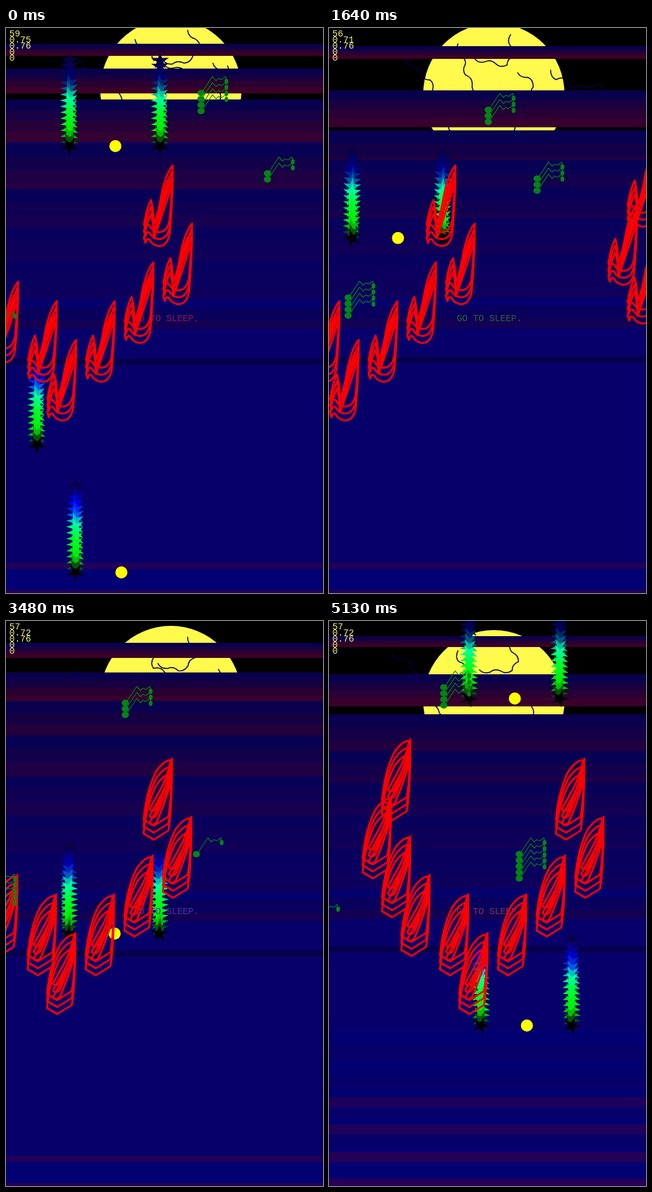
An HTML page with a canvas that plays this animation: 525x933 px, repeating every 5230 ms.

```html
<!DOCTYPE html>
<html lang="en">
<head>
<meta charset="utf-8">
<title>Go to sleep</title>
<style>
html, body { margin: 0; width: 100%; height: 100%; overflow: hidden; background: #000; }
canvas { display: block; width: 100vw; height: 100vh; }
</style>
</head>
<body>
<canvas id="stage" width="525" height="933"></canvas>
<script>
const W = 525, H = 933, LOOP = 5230, STEP = 570 / 9, TAU = Math.PI * 2;
const ctx = document.getElementById('stage').getContext('2d');

const mix = (a, b, u) => a + (b - a) * u;
const mixAll = (a, b, u) => a.map((v, i) => mix(v, b[i], u));
const rgb = c => `rgb(${c.map(Math.round).join()})`;
const clamp = (v, lo, hi) => Math.min(hi, Math.max(lo, v));
const hash = n => { const s = Math.sin(n * 127.1) * 43758.5453; return s - Math.floor(s); };
const ease = u => { u = clamp(u, 0, 1); return u * u * (3 - 2 * u); };
const bell = (t, peak, width) => Math.exp(-(((t - peak) / width) ** 2));
// Cosine that peaks at the given time
const wave = (t, peak, period) => Math.cos(TAU * (t - peak) / period);

const sway = t => 143 - 210 * Math.cos(0.00047 * (t - 1750));
const swell = t => Math.max(0, wave(t, 910, 2050));

function rect(y, h, color) {
  const top = Math.round(y);
  ctx.fillStyle = rgb(color);
  ctx.fillRect(0, top, W, Math.round(y + h) - top);
}
function ellipse(x, y, rx, ry) {
  ctx.beginPath();
  ctx.ellipse(x, y, rx, ry, 0, 0, TAU);
  ctx.fill();
}
function at(x, y, paint) {
  ctx.save();
  ctx.translate(x, y);
  paint();
  ctx.restore();
}

// Moon with wandering cracks that start near its rim
function drawCrack(k, t) {
  let a = k * TAU / 7 + 0.5, x = 102 * Math.cos(a), y = 102 * Math.sin(a);
  a += Math.PI;
  ctx.beginPath();
  ctx.moveTo(x, y);
  for (let i = 0; i < 6; i++) {
    a += 2.6 * (hash(k * 11 + i + 3) - 0.5) + 0.4 * Math.sin(t * 0.002 + i * 2 + k);
    const mx = x + 12 * Math.cos(a), my = y + 12 * Math.sin(a);
    a += 1.2 * (i % 2 ? 1 : -1);
    x = mx + 10 * Math.cos(a);
    y = my + 10 * Math.sin(a);
    ctx.quadraticCurveTo(mx, my, x, y);
  }
  ctx.stroke();
}
function drawMoon(t) {
  at(273, 117 - 15 * Math.cos(Math.PI * t / 5130), () => {
    ctx.fillStyle = '#fffa4b';
    ellipse(0, 0, 117, 117);
    ctx.strokeStyle = '#08003c';
    ctx.lineWidth = 1.7;
    for (let k = 0; k < 7; k++) drawCrack(k, t);
  });
}

// Sea: each band is four strips running from navy to maroon
const SEA = [8, 0, 106], BRIGHT = [2, 0, 114];
const STRIPS = [[8, 0, 76], [24, 0, 64], [42, 0, 50], [60, 0, 40]];

function bandY(i, t) {
  const reach = (16 + 10 * Math.sin(i * 0.8)) * (1.1 - t / 8000);
  return 30 + 58 * i + reach * wave(t, 870 + 390 * i, 3080);
}
function drawBand(y) {
  const h = Math.min(0.14 * y + 1, 22);
  STRIPS.forEach((c, i) => {
    const top = y + i * h;
    rect(top, h + 0.4, mixAll(c, [8, 0, 100], clamp((top - 110) / 340, 0, 0.85)));
  });
}
function drawSea(t) {
  rect(bandY(2, t), H, SEA);
  for (let i = 0; i < 7; i++) drawBand(bandY(i, t));

  const bob = Math.cos(t * 0.0035), glow = 433 + 14 * bob, dark = 522 + 24 * bob;
  rect(glow, 15, [4, 0, 108]);
  rect(glow + 15, 20, [8, 0, 92]);
  rect(glow + 35, 15, [18, 0, 84]);
  rect(glow + 50, H, SEA);
  rect(dark, 10, [6, 0, 76]);

  const s = swell(t);
  for (let y = 675; y < H; y += 48) rect(y, 28, mixAll(SEA, BRIGHT, s));
  for (let i = 0; i < 4; i++) {
    const y = 785 + 45 * i, h = (10 + 9 * s) * (i < 2 ? s : 1);
    if (i === 2) rect(y + h, H, BRIGHT);
    rect(y + 8 * (1 - s), h, [28 + i * 3, 0, 92 - i * 2]);
  }
}

// Falling star columns
const STAR = new Path2D();
for (let i = 0; i < 10; i++) {
  const r = i % 2 ? 5.5 : 15.5, a = Math.PI * (0.5 + i / 5);
  STAR.lineTo(r * Math.cos(a), r * Math.sin(a));
}
STAR.closePath();

function starColor(u, y) {
  const blue = clamp(90 + y * 0.22, 90, 235);
  const ramp = [
    [0, [8, 0, 66]], [0.2, [0, 0, blue]], [0.32, [0, 70, blue + 20]],
    [0.44, [0, 255, 170]], [0.62, [0, 255, 40]], [0.84, [0, 235, 0]],
    [0.93, [0, 90, 0]], [1, [0, 0, 0]]
  ];
  let i = 0;
  while (i < ramp.length - 2 && u > ramp[i + 1][0]) i++;
  const [u0, a] = ramp[i], [u1, b] = ramp[i + 1];
  return rgb(mixAll(a, b, (u - u0) / (u1 - u0)));
}
function drawColumn(x, y, t) {
  const n = 16;
  for (let i = 0; i < n; i++) {
    const u = i / (n - 1), sy = y - 141 * (1 - u);
    at(x, sy, () => {
      ctx.rotate(t * 0.0002 + (n - 1 - i) * 0.042);
      ctx.fillStyle = starColor(u, sy);
      ctx.fill(STAR);
    });
  }
}
// A dot between two optional columns; gone once it leaves the stage
function drawGroup(x, y, t, sides) {
  if (y > H) return;
  sides.forEach(dx => drawColumn(x + dx, y, t));
  ctx.fillStyle = '#ff0';
  ellipse(x, y, 10, 10);
}
function drawStars(t) {
  const dx = sway(t), fall = t * 0.0922;
  if (fall + 688 < H) drawColumn(51 + dx, 688 + fall, t);
  drawGroup(191 + dx, 899 + fall, t, [-76]);
  drawGroup(181 + dx, 195 + fall, t, [-76, 74]);
  if (t > 3995) drawGroup(161 + dx, 128 - (5130 - t) * 0.13, t, [-76, 74]);
}

// Red fleet: three poses, each traced three times downwards
const POSES = [
  'M48 1Q47 45 43 91Q39 112 24 111Q14 109 10 101Q5 96 3 106Q-1 94 1 97Q4 74 12 58L15 72L17 98Q22 86 27 62Q34 18 48 1M17 98Q30 62 46 12',
  'M48 1Q47 70 42 97L18 112L1 102Q6 52 22 22Q36 3 46 4Q41 30 30 50Q18 72 11 84Q14 91 22 84Q34 58 46 18',
  'M12 106L46 26L48 110Q40 115 33 109Q24 116 15 110Q8 108 1 114L5 70Q12 75 19 71L12 106M22 13Q22 0 29 0Q35 2 35 14Q34 26 28 26Q22 22 22 13'
].map(d => new Path2D(d));
const FLEET = [
  [-9, -1], [-10, 2], [-9, 4], [-8, 6], [-6, 7],
  [-5, 9], [-3, 7], [-1, 5], [1, 3], [0, 0]
];
function drawFleet(t) {
  const pose = POSES[Math.floor((t + 34) * 0.009) % 3];
  ctx.strokeStyle = '#f00';
  ctx.lineWidth = 3.2;
  ctx.lineJoin = ctx.lineCap = 'round';
  FLEET.forEach(([col, row]) => {
    let x = 228 + sway(t) + col * 32;
    if (x < -96) x += W + 96;
    for (let i = 0; i < 3; i++) at(x, 226 + row * 32 + i * 11.5, () => ctx.stroke(pose));
  });
}

// Green notes, stacked ten pixels apart
const STEM = new Path2D('M3 -3L19 -27L25 -20L29 -24L34 -22L41 -27L42 -19');
function drawStack(x, y, n) {
  for (let i = 0; i < Math.round(n); i++) {
    at(x, y + i * 10, () => {
      ctx.stroke(STEM);
      ellipse(0, 0, 6, 5.2);
      ellipse(42, -19, 3.2, 4.2);
    });
  }
}
function drawNotes(t) {
  ctx.fillStyle = ctx.strokeStyle = '#058414';
  ctx.lineWidth = 1.2;
  const hop = wave(t, 1640, 920);
  if (swell(t) < 0.96) drawStack(Math.max(190, 323 - 0.036 * t), 100 + 35 * hop, 4.5 - 1.8 * hop);
  drawStack(315 + 118 * bell(t, 0, 1400), 240 + 145 * ease((t - 1500) / 1000),
    Math.max(1, 1.5 + 3.5 * wave(t, 910, 4200)));
  drawStack(62 * bell(t, 1800, 650) - 27, 460 + 35 * wave(t, 0, 5130),
    Math.max(1, 2 + 3 * wave(t, 1250, 2400)));
}

// Text
function drawHint(t) {
  ctx.fillStyle = rgb([
    85 + 70 * wave(t, 300, 4200),
    65 - 45 * wave(t, 0, 4300),
    105 + 60 * wave(t, 900, 1300)
  ]);
  ctx.fillText('GO TO SLEEP.', 211.5, 484);
}
function drawStats(t) {
  const stage = [910, 1640, 2160].filter(k => t + 25 >= k).length;
  const rate = [59, 58, 56, 57][stage];
  ctx.fillStyle = '#f5f07a';
  [rate, (rate * 0.0127).toFixed(2), '0.76', '0', '0']
    .forEach((s, i) => ctx.fillText(s, 5.5, 14 + i * 10));
}

function draw(time) {
  const t = Math.floor((time % LOOP + 10) / STEP) * STEP;
  ctx.fillStyle = '#000';
  ctx.fillRect(0, 0, W, H);
  ctx.font = '15px "Liberation Mono", monospace';
  drawMoon(t);
  drawSea(t);
  drawStars(t);
  drawHint(t);
  drawFleet(t);
  drawNotes(t);
  drawStats(t);
}

const start = performance.now();
function tick() {
  draw(performance.now() - start);
  requestAnimationFrame(tick);
}
tick();
</script>
</body>
</html>
```
